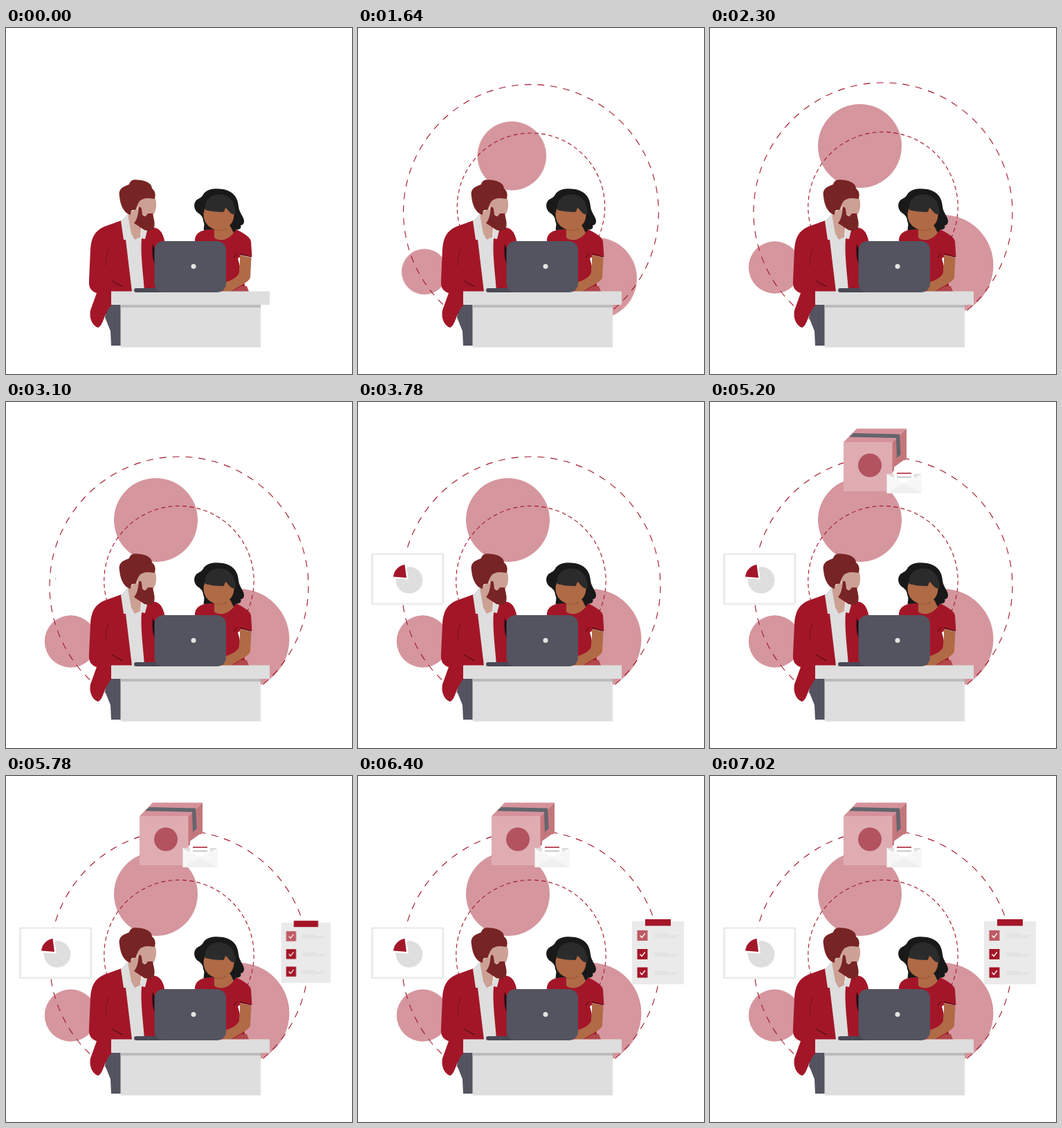
Write an HTML page without scripts that moves like this. It is 500x500 px and loops after 7040 ms.

```html
<!DOCTYPE html>
<html lang="en">
<head>
<meta charset="utf-8">
<title>Two people at a desk</title>
<style>
  html, body { margin: 0; width: 100%; height: 100%; overflow: hidden; background: #fff; }
  svg { display: block; width: 100vw; height: 100vh; }

  .red { fill: #a31628; }
  .slate { fill: #535460; }
  .grey { fill: #dedede; }
  .white { fill: #fff; }
  .skin { fill: #b06a46; }
  .paleSkin { fill: #cda094; }
  .auburn { fill: #772424; }
  .blob { fill: #d5969e; }
  .ring { fill: none; stroke: #a31628; stroke-width: 1.1; r: var(--r); }
  .fold { fill: none; stroke: #3a0a12; }

  .ring, .blob, .pop {
    transform-box: fill-box;
    transform-origin: center;
    animation: 7.04s ease-in-out infinite;
  }
  .ring { animation-name: ring; }
  .blob { animation-name: blob; transform-origin: 77% 116%; }
  .chart { animation-name: chart; }
  .parcel { animation-name: parcel; }
  .list { animation-name: list; }

  /* Rings grow by radius so that their thin dashes stay sharp. */
  @keyframes ring {
    0%, 16.19% { r: 0px; animation-timing-function: linear; }
    17.9% { r: calc(var(--r) * .85); animation-timing-function: ease-out; }
    18.9% { r: calc(var(--r) * 1.176); }
    21.6% { r: calc(var(--r) * .965); }
    23.3% { r: calc(var(--r) * .986); }
    24.4% { r: calc(var(--r) * 1.005); }
    25.9%, 100% { r: var(--r); }
  }
  @keyframes blob {
    0%, 20.3% { transform: scale(0); animation-timing-function: linear; }
    23.3% { transform: scale(var(--rise, .82)); animation-timing-function: ease-out; }
    25.9% { transform: scale(1.1); }
    29.8% { transform: scale(.99); }
    32%, 100% { transform: scale(1); }
  }
  @keyframes chart {
    0%, 43.85% { transform: scale(0); animation-timing-function: linear; }
    46.6% { transform: scale(.78); animation-timing-function: ease-out; }
    48.15% { transform: scale(1.045); }
    51.28% { transform: scale(.955); }
    53.7%, 100% { transform: scale(1); }
  }
  @keyframes parcel {
    0%, 59.3% { transform: scale(0); animation-timing-function: linear; }
    62% { transform: scale(.78); animation-timing-function: ease-out; }
    63.56% { transform: scale(1.045); }
    65.34% { transform: scale(.98); }
    66.69% { transform: scale(.965); }
    69.1%, 100% { transform: scale(1); }
  }
  @keyframes list {
    0%, 74.72% { transform: scale(0); animation-timing-function: linear; }
    77.3% { transform: scale(.71); animation-timing-function: ease-out; }
    78.98% { transform: scale(1.03); }
    82.1% { transform: scale(.955); }
    84.5%, 100% { transform: scale(1); }
  }
</style>
</head>
<body>
<svg viewBox="0 0 500 500">
  <defs>
    <g id="task">
      <rect width="15" height="15"/>
      <path d="M4 7.5l2.7 3L11.3 4.5" fill="none" stroke="#fff" stroke-width="1.3"/>
      <path d="M24.5 6h20M24.5 8h34M24.5 10.2h30" fill="none" stroke="#dadada" stroke-width=".9"/>
    </g>
  </defs>

  <circle class="blob" cx="216.5" cy="170.5" r="60.5"/>
  <circle class="blob" cx="93.5" cy="346" r="37.7" style="--rise:.875"/>
  <circle class="blob" cx="336.5" cy="343" r="73" style="--rise:.805"/>
  <circle class="ring" cx="250" cy="266" style="--r:187px" pathLength="620" stroke-dasharray="5.3 4.7"/>
  <circle class="ring" cx="250" cy="258.5" style="--r:108.2px" pathLength="660" stroke-dasharray="5.8 4.2"/>

  <g class="pop chart">
    <rect x="19" y="218.5" width="105.5" height="74.5" fill="#ebebeb"/>
    <rect class="white" x="22" y="221" width="99.5" height="69.5"/>
    <circle class="grey" cx="74" cy="257.5" r="19.3"/>
    <path class="red" stroke="#fff" stroke-width="5" paint-order="stroke" d="M70 254L51 252.5A19.5 19.5 0 0 1 67.5 235Z"/>
  </g>

  <g class="pop parcel">
    <path fill="#d6929b" d="M193 58L212 38.5H284L263 58.5Z"/>
    <path fill="#c4777b" d="M263 58.5L284 38.5V82L263 102Z"/>
    <path fill="#dfacb2" d="M193 58H263.5V129H193Z"/>
    <path fill="#63656d" d="M201 50.5L207 45L274 46.5L275.5 76L270 81L269 52Z"/>
    <circle fill="#b35360" cx="231" cy="91.5" r="17"/>
    <path class="grey" d="M255.5 104H306L280 118Z"/>
    <path class="white" d="M266 94L280 84L295 94V110L280 118L266 110Z"/>
    <path d="M270 103H291" stroke="#a31628" stroke-width="1.5"/>
    <path d="M270 108.5H291" stroke="#aaa" stroke-width="1.2"/>
    <path fill="#f8f7f7" d="M255.5 104L280 118L306 104V132H255.5Z"/>
    <path fill="#f1f0f0" d="M255.5 132L280 118L306 132Z"/>
  </g>

  <g class="pop list">
    <rect fill="#eaeaea" x="396" y="210" width="75" height="91"/>
    <rect class="red" x="415" y="207" width="37" height="9.5"/>
    <use href="#task" x="403.5" y="223" fill="#bd5a63"/>
    <use href="#task" class="red" x="403.5" y="250"/>
    <use href="#task" class="red" x="403.5" y="276.5"/>
  </g>

  <g id="woman">
    <path fill="#191919" d="M286 239C292 231 308 231 318 234C330 238 335 246 336 258C337 267 344 273 344 279C344 284 341 285 339 285C341 289 337 292 333.500 291C334 297 327 299 323 296L318 291L286 292C285 288 288 284 285 279C285 272 280 269 276 266C271 261 271 253 275 249C278 246 283 246 286 239Z"/>
    <path class="red" d="M273 308C273 297 280 291 300 291L326 299L333 291C342 296 352 301 354 308L355.5 331L338 328L345 372L351 381H273Z"/>
    <path fill="#b0484c" d="M340 373H348L351 381H325Z"/>
    <path class="skin" d="M301 286H324L329 296C321 307 308 309 301 303Z"/>
    <circle class="skin" cx="307.5" cy="270" r="22"/>
    <path d="M300 291Q309 295 319 289" fill="none" stroke="#8c5135" stroke-width=".8"/>
    <path fill="#2b2b2b" d="M288 263C286 248 297 240 309 240.5C322 241 332 251 332 269H327C323 267 321 263 318 260C315 261 317 266 313 266C304 266 296 265 288 263Z"/>
    <path class="skin" d="M338 328L354.5 332L353 360C352 368 333 374 325 381H313L318 367C328 364 338 358 337 351Z"/>
    <path class="white" d="M335 333L338 331V344Z"/>
    <path class="fold" d="M329 332L334 326M338 326L354 331"/>
  </g>

  <g id="man">
    <path class="slate" d="M145 408L152 400H166V459H152L151 438L143 418Z"/>
    <path class="red" d="M167 278L142 287C128 293 123 304 122 320L120 365C119 377 125 381 131 383L122 408C120 418 124 430 133 433C141 430 141 413 152 401L184 381H216L229 307C226 293 220 287 207 288L195 306Z"/>
    <path class="grey" d="M166 279L176 268L185 303L195 300L196 291L204 293L201 305L196 304C194 326 198 352 200 381H182L173 306L170 306Z"/>
    <path class="paleSkin" d="M176 269L189 260L196 284L194 302L186 306L181 297Z"/>
    <path class="paleSkin" d="M190 253L199 244H215C219 254 217 265 212 271H200L190 280Z"/>
    <path class="auburn" d="M164 243C162 232 170 229 178 226C180 219 185 219 190 219.5C201 220 211 224 211 232C216 235 217 244 214 247C205 245 195 246 192 252C189 255 190 262 186 263C181 262 180 266 180 270C171 268 165 257 164 243Z"/>
    <path class="auburn" d="M192 259C196 258 196 260 197 270C200 273 203 272 205 268H212C213 275 216 281 214 288C211 295 205 293 200 292L185 282C190 276 191 269 192 259Z"/>
    <path class="fold" d="M153 365Q160 370 169 374"/>
    <path class="fold" stroke-width=".4" d="M148 320Q143 332 144 344"/>
    <path fill="#240b14" d="M212 312L215 319V342Q210 330 212 312Z"/>
  </g>

  <g id="desk">
    <rect class="grey" x="165.5" y="400" width="202.5" height="61.5"/>
    <rect fill="#bcbcbc" x="165.5" y="400" width="202.5" height="4"/>
    <rect class="grey" x="152" y="380.5" width="229" height="19.5"/>
    <rect fill="#484955" x="185" y="376" width="60" height="6" rx="3"/>
    <rect class="slate" x="214.5" y="308" width="103.5" height="74" rx="13"/>
    <circle fill="#e4e4e4" cx="271" cy="344.5" r="3.5"/>
  </g>
</svg>
</body>
</html>
```
